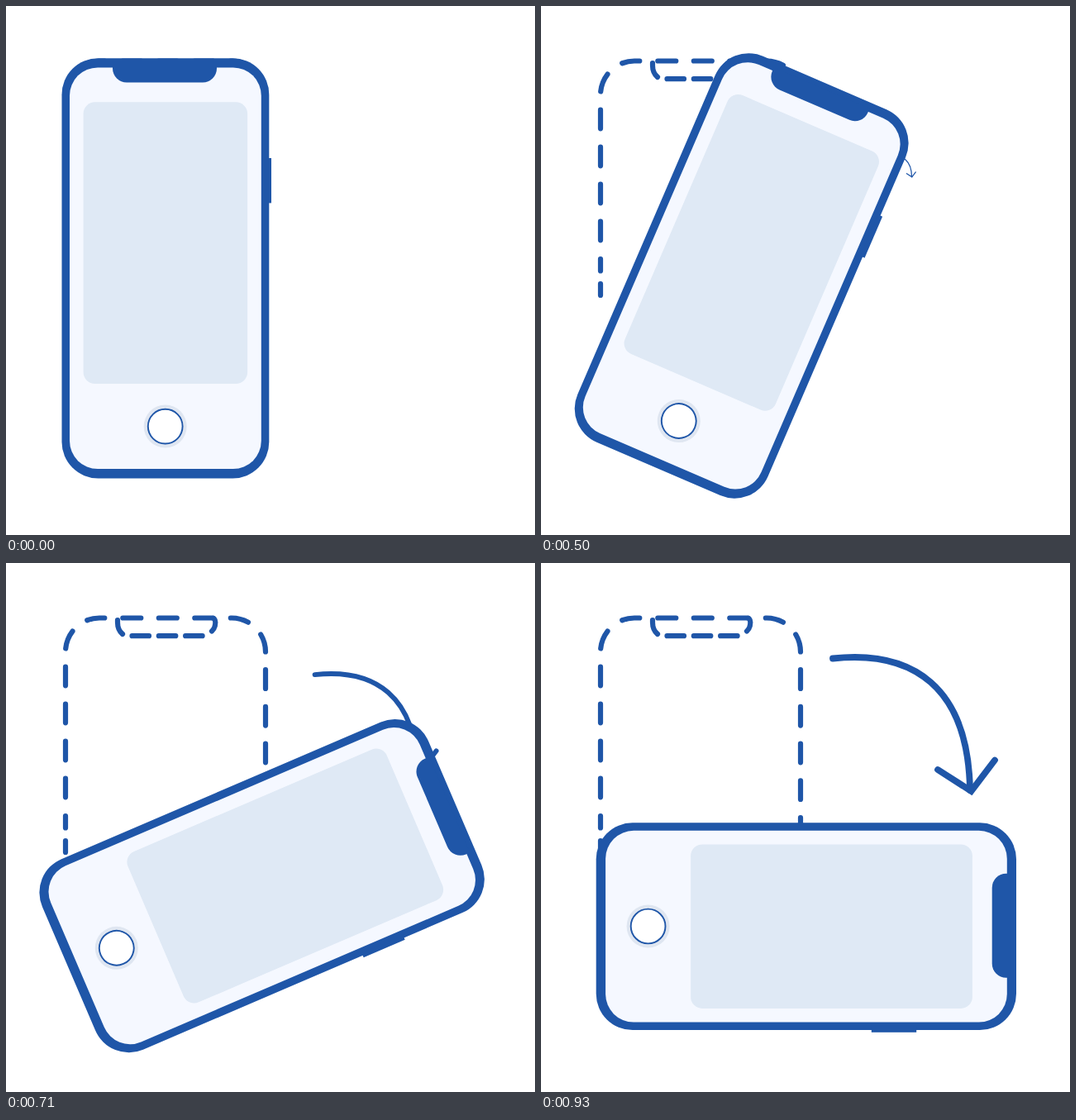
Animation, 640 px wide and 640 px high, one loop 1210 ms. Source, as an HTML page:

```html
<!DOCTYPE html>
<html lang="en">
<head>
<meta charset="utf-8">
<title>Rotate phone</title>
<style>
  html, body { margin: 0; width: 100%; height: 100%; overflow: hidden; background: #fff; }
  svg { display: block; width: 100%; height: 100%; }
  .line { fill: none; stroke: #1f56a8; stroke-linecap: round; }
</style>
</head>
<body>
<svg viewBox="0 0 640 640">
  <!-- dashed ghost of the upright phone -->
  <g class="line" stroke-width="6.2">
    <path d="M72 350V336M72 320.5V306"/>
    <path d="M72 283.3V107.5A41 41 0 0 1 113 66.5H119.3" stroke-dasharray="22.6 22.4"/>
    <path d="M141.3 66.5H273A41 41 0 0 1 314 107.5" stroke-dasharray="22 21.5"/>
    <path d="M314 129.2V330" stroke-dasharray="22.7 22"/>
    <path d="M135 69V72Q135 81 141 86"/>
    <path d="M152.5 88.2H238" stroke-dasharray="20.5 11.8"/>
    <path d="M249 82.5Q253.3 78.5 253.3 72Q253 67.5 251 67"/>
  </g>
  <g id="arrow" class="line" stroke-width="7.8">
    <path d="M353 115.5C450 105 517 150 519 275"/>
    <path d="M480 250L520.5 276L549 238.5"/>
  </g>
  <g id="phone">
    <g fill="#1f56a8">
      <rect x="67.5" y="63.2" width="250.8" height="508.3" rx="44"/>
      <rect x="315" y="184" width="6" height="54.4"/>
    </g>
    <rect x="77" y="74.4" width="231.8" height="485.7" rx="34" fill="#f5f8ff"/>
    <path d="M129 70V75.5A17 17 0 0 0 146 92.5H238A17 17 0 0 0 255 75.5V70Z" fill="#1f56a8"/>
    <rect x="93.6" y="116.3" width="198.5" height="340.8" rx="14" fill="#dfe9f5"/>
    <circle cx="192.7" cy="508.6" r="26" fill="#dfe6f1"/>
    <circle cx="192.7" cy="508.6" r="20.9" fill="#fff" stroke="#1f56a8" stroke-width="1.9"/>
  </g>
</svg>
<script>
  const LOOP = 1210;
  const STEPS = [360, 430, 500, 570, 640, 710, 790, 860, 930];
  const phone = document.getElementById('phone');
  const arrow = document.getElementById('arrow');
  const clamp = x => Math.max(0, Math.min(1, x));
  const ease = x => (1 - Math.cos(Math.PI * clamp(x))) / 2;

  // The turn advances in held steps, with a shorter one halfway.
  function progress(time) {
    const step = STEPS.filter(start => start <= time).length - 1;
    if (step < 0) return 0;
    return clamp(step < 4 ? 0.074 + 0.133 * step : 0.529 + 0.132 * (step - 4));
  }

  function draw(now) {
    const turn = progress(now % LOOP);
    const size = ease((turn - 0.134) * 1.265);
    phone.setAttribute('transform', `rotate(${90 * ease(turn)} 195.7 442.5)`);
    arrow.setAttribute('transform',
      `translate(435.3 193.8) scale(${size}) translate(-435.3 -193.8)`);
    arrow.setAttribute('visibility', size > 0 ? 'visible' : 'hidden');
  }

  const begin = performance.now();
  function tick() {
    draw(performance.now() - begin);
    requestAnimationFrame(tick);
  }
  tick();
</script>
</body>
</html>
```
